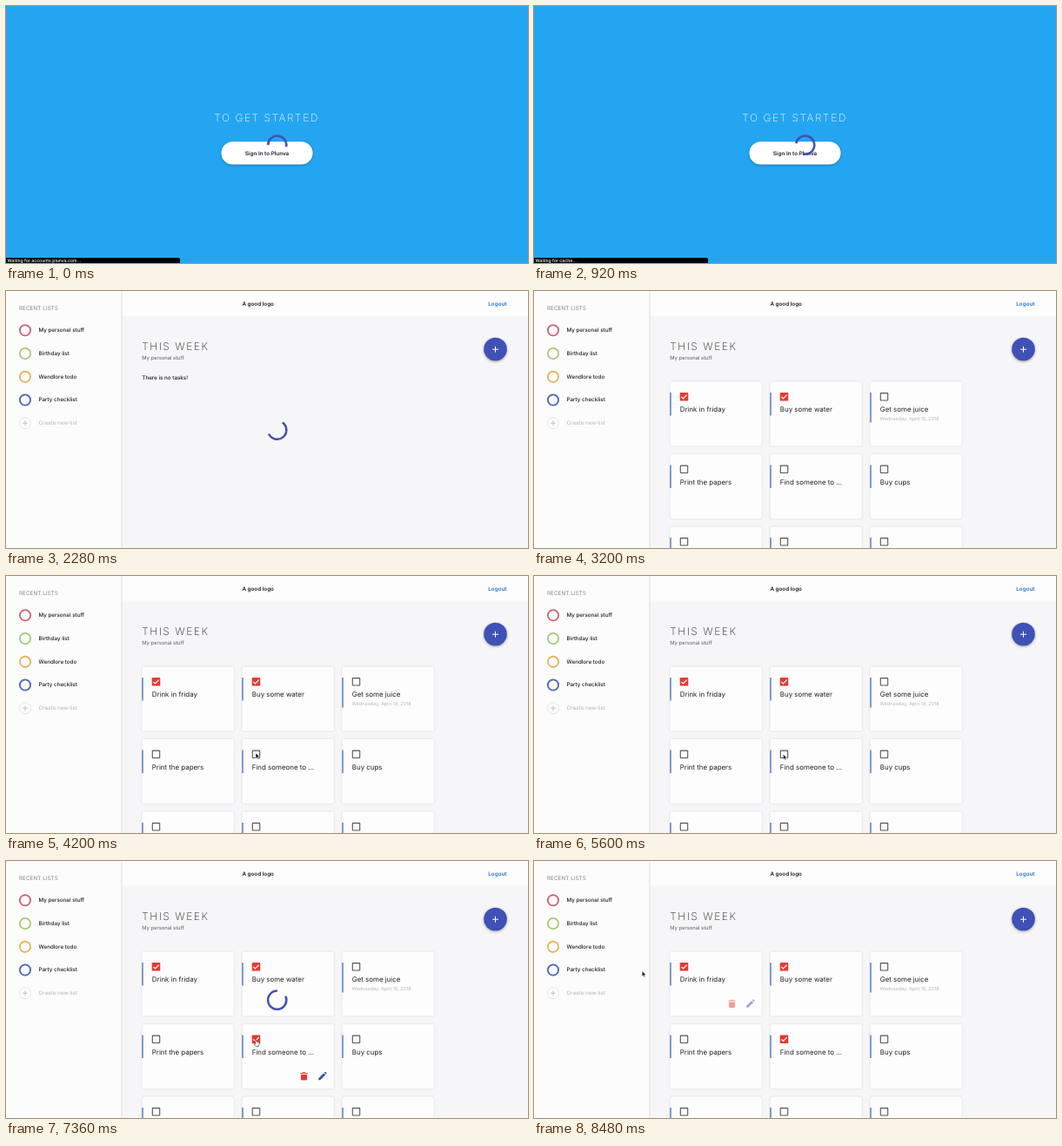
Animation of 600x296 px, one loop 8520 ms. Source, as an HTML page:

```html
<!DOCTYPE html>
<html lang="en">
<head>
<meta charset="utf-8">
<title>Task lists</title>
<style>
html, body { margin: 0; width: 100%; height: 100%; overflow: hidden; background: #f6f5f7; }
svg { display: block; width: 600px; height: 296px; }
text { font-family: Inter, "Open Sans", sans-serif; text-rendering: geometricPrecision; white-space: pre; }
.head { font-size: 12px; font-weight: 200; letter-spacing: 1.55px; }
.bold { font-size: 6.3px; font-weight: 600; }
.item { font-size: 6.25px; font-weight: 500; }
.task { font-size: 7.9px; fill: #222; }
.card { filter: drop-shadow(0 .6px 1px #0002); }
</style>
</head>
<body>
<svg id="stage" viewBox="0 0 600 296"></svg>
<script>
const LOOP = 8520;
const APP_AT = 1400, TASKS_AT = 2700, CHECK_AT = 6800, SAVED_AT = 7800;

const text = (x, y, str, cls, fill = '#1c1c1f', extra = '') =>
  `<text x="${x}" y="${y}" class="${cls}" fill="${fill}" ${extra}>${str}</text>`;
const box = (x, y, w, h, fill, extra = '') =>
  `<rect x="${x}" y="${y}" width="${w}" height="${h}" fill="${fill}" ${extra}/>`;
const line = (d, color, width, extra = '') =>
  `<path d="${d}" fill="none" stroke="${color}" stroke-width="${width}" ${extra}/>`;

const signIn = box(0, 0, 600, 296, '#24a5f1') +
  text(239.3, 133, 'TO GET STARTED', 'head', '#fff') +
  box(247.5, 156.2, 105, 26.3, '#fff', 'rx="13.1" style="filter:drop-shadow(0 1px 1.5px #0004)"') +
  text(300, 171.8, 'Sign In to Plunva', 'bold', '#1c1c2c', 'text-anchor="middle"') +
  '<path d="M0 290H198.500Q200 290 200 291.500V296H0Z" fill="#000"/>' +
  text(1.5, 295, '', 'status', '#fff', 'id="status" font-size="5.1" font-weight="500"');

const lists = [
  ['My personal stuff', '#cf6470'],
  ['Birthday list', '#a3cb74'],
  ['Wendlore todo', '#e8b158'],
  ['Party checklist', '#4663c3'],
].map(([name, color], i) => {
  const y = 45.2 + i * 26.75;
  return `<circle cx="22" cy="${y}" r="6.1" fill="none" stroke="${color}" stroke-width="1.8"/>` +
    text(37.5, y + 2, name, 'item');
}).join('');

const frame = box(0, 0, 600, 296, '#f6f5f7') +
  box(133, 0, 467, 28.5, '#fefdfe') +
  box(0, 0, 132.5, 296, '#fdfcfd', 'style="filter:drop-shadow(.5px 0 1px #0003)"') +
  text(15, 22, 'RECENT LISTS', '', '#85858a', 'font-size="6.4"') + lists +
  '<circle cx="22" cy="152.200" r="6.500" fill="none" stroke="#dedee1" stroke-width=".8"/>' +
  line('M19 152.200H25M22 149.200V155.200', '#b4b4b8', .8) +
  text(37.5, 154.2, 'Create new list', 'item', '#bcbcc0') +
  text(271.4, 17.2, 'A good logo', 'bold') +
  text(554.3, 17.2, 'Logout', 'bold', '#2470c4') +
  text(156.3, 67.6, 'THIS WEEK', 'head', '#222') +
  text(156.3, 78.6, 'My personal stuff', '', '#5c5c60', 'font-size="5.85"') +
  '<circle cx="562.500" cy="67" r="13.300" fill="#3f51b5" style="filter:drop-shadow(0 1px 1.500px #0005)"/>' +
  line('M559 67.200H566M562.500 63.700V70.700', '#fff', 1);

const checked = box(-4.8, -4.8, 9.6, 9.6, '#e53a32', 'rx=".9"') +
  line('M-3 .2L-1 2.200L3.200 -2.200', '#fff', 1.2);
const unchecked = box(-4.2, -4.2, 8.4, 8.4, 'none', 'rx=".5" stroke="#555" stroke-width="1.1"');
const icons = '<path d="M67.400 57.800H74.600V63.200Q74.600 64.400 73.400 64.400H68.600Q67.400 64.400 67.400 63.200ZM66.700 55.800H69.300L70 55.100H72L72.700 55.800H75.300V57H66.700Z" fill="#e53a32"/>' +
  '<path d="M87.700 64.200V62.200L93.600 56.300L95.600 58.300L89.700 64.200ZM94.200 55.700L95 54.900Q95.400 54.600 95.800 54.900L97 56.100Q97.300 56.500 97 56.900L96.200 57.700Z" fill="#3453a8"/>';

const tasks = ['Drink in friday', 'Buy some water', 'Get some juice',
  'Print the papers', 'Find someone to ...', 'Buy cups', '', '', ''];
const cards = tasks.map((name, i) => {
  const x = 156.5 + i % 3 * 115, y = 104.6 + Math.floor(i / 3) * 83.5;
  return `<g transform="translate(${x} ${y})">` +
    box(0, 0, 105.3, 74, '#fefdfe', 'rx="2.5" class="card"') +
    box(-.2, 12.4, 1.4, i === 2 ? 34.5 : 26.5, '#5078b8') +
    `<g id="check${i}" transform="translate(16 17.200)">${i < 2 ? checked : unchecked}</g>` +
    text(11.3, 34.8, name, 'task') +
    (i === 2 ? text(11, 44.2, 'Wednesday, April 18, 2018', '', '#b6b6ba', 'font-size="5.5"') : '') +
    `<g id="icons${i}" opacity="0">${icons}</g></g>`;
}).join('');

const arrow = '<path d="M0 0V6.200L1.500 4.900L2.500 7L3.600 6.500L2.600 4.500H4.500Z" fill="#111" stroke="#fff" stroke-width=".5"/>';
const hand = '<path d="M-.2 1Q.6 .2 1 1.200L1.600 3Q2.300 2.600 2.700 3.100Q3.400 2.800 3.700 3.400Q4.500 3.300 4.600 4.200V6.300L3.800 8.300H.9L-1.500 5.600Q-1.300 4.700 -.4 5.200L.3 5.600Z" fill="#fff" stroke="#222" stroke-width=".6"/>';

const stage = document.getElementById('stage');
stage.innerHTML = `<g id="signIn">${signIn}</g><g id="app">${frame}` +
  text(156.3, 102.4, 'There is no tasks!', 'item', '#1c1c1f', 'id="empty"') +
  `<g id="cards">${cards}</g></g>` +
  line('', '#3f51b5', 2.5, 'id="spinner"') +
  `<g id="cursor"><g id="arrow">${arrow}</g><g id="hand">${hand}</g></g>`;

const get = id => document.getElementById(id);
const show = (id, on) => get(id).setAttribute('display', on ? 'inline' : 'none');
const clamp = v => Math.max(0, Math.min(1, v));
const ramp = (t, a, b) => clamp((t - a) / (b - a));
const smooth = v => v * v * (3 - 2 * v);

// Keys are [time, start angle, sweep], in ms and degrees.
const turns = [[0, 180, 190], [920, 550, 275], [2280, 1025, 210], [7360, 3215, 295], [LOOP, 3780, 190]];
function spinnerPath(t) {
  const i = turns.findIndex(k => k[0] > t);
  const a = turns[i - 1], b = turns[i], p = ramp(t, a[0], b[0]);
  const from = a[1] + (b[1] - a[1]) * p, sweep = a[2] + (b[2] - a[2]) * p;
  const point = deg => {
    const r = deg * Math.PI / 180;
    return `${311.7 + 10.6 * Math.cos(r)} ${160.2 + 10.6 * Math.sin(r)}`;
  };
  return `M${point(from)}A10.6 10.6 0 ${sweep > 180 ? 1 : 0} 1 ${point(from + sweep)}`;
}

let wasDone = false;
function draw(t) {
  const loaded = t >= TASKS_AT, done = t >= CHECK_AT;
  show('signIn', t < APP_AT);
  show('app', t >= APP_AT);
  get('status').textContent = t < 480 ? 'Waiting for accounts.plunva.com...' : 'Waiting for cache...';
  show('empty', !loaded);
  show('cards', loaded);
  show('spinner', !loaded || (done && t < SAVED_AT));
  get('spinner').setAttribute('d', spinnerPath(t));

  if (done !== wasDone) get('check4').innerHTML = done ? checked : unchecked;
  wasDone = done;
  get('icons4').setAttribute('opacity', ramp(t, 5880, 6080) * (1 - ramp(t, 8120, 8320)));
  get('icons0').setAttribute('opacity', ramp(t, 8200, 8330) * (1 - ramp(t, 8380, 8580)));

  const move = smooth(ramp(t, 8040, 8480)), nudge = ramp(t, 4440, 5280);
  const x = 287 - .6 * nudge - 162.2 * move, y = 203.8 + 1.4 * nudge - 78.4 * move;
  const pointing = t >= 5880 && t < 8080;
  show('cursor', t >= 3560);
  show('arrow', !pointing);
  show('hand', pointing);
  get('cursor').setAttribute('transform', `translate(${x} ${y})`);
}

const began = performance.now();
function tick() {
  draw((performance.now() - began) % LOOP);
  requestAnimationFrame(tick);
}
tick();
</script>
</body>
</html>
```
